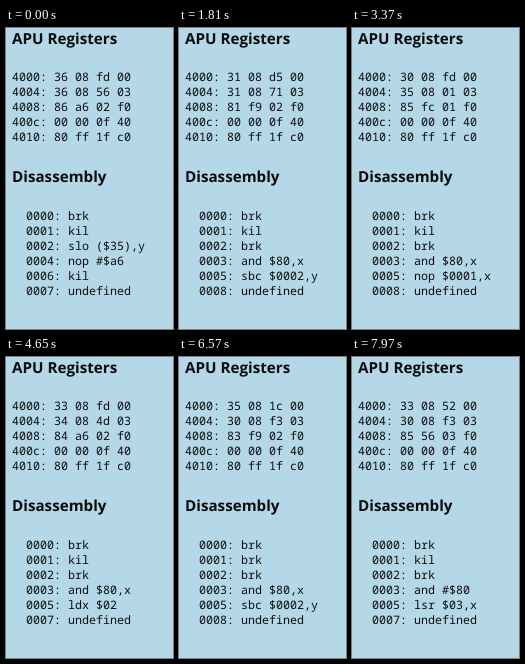
Recreate the animation shown at these times as an HTML page. Size 167 by 301 pixels, loop 8 s.

```html
<!DOCTYPE html>
<html lang="en">
<head>
<meta charset="utf-8">
<title>APU Registers</title>
<style>
  html, body { margin: 0; width: 100%; height: 100%; overflow: hidden; background: #b4d8e7; }
  svg { display: block; width: 167px; height: 301px; }
  text { fill: #0c0c0c; white-space: pre; text-rendering: geometricPrecision; }
  .head { font: bold 15.2px "Open Sans", sans-serif; }
  .code { font: 500 11.667px "Noto Sans Mono", monospace; }
</style>
</head>
<body>
<svg id="stage" viewBox="0 0 167 301"></svg>
<script>
const LOOP = 8000, PITCH = 15, LEFT = 6;

// Phrases: start, end, steps, step at which the values hold, then
// volume/period of both pulses, linear counter and period of the triangle, three work bytes
const phrases = [
  [0, 0, 1, 0, '36 fd 36 56 86 a6 02 02 13 35'],
  [80, 850, 11, -1, '36 fd 36 56 86 a6 02 02 13 35'],
  [930, 1730, 13, 4, '34 d5 34 f8 84 56 03 02 00 35'],
  [1810, 2570, 13, 9, '36 d5 36 74 86 f9 02 02 07 35'],
  [2650, 3450, 13, 11, '30 fd 35 01 85 fc 01 02 00 35'],
  [3490, 4250, 12, 2, '36 fd 36 01 86 fc 01 02 00 35'],
  [4370, 5170, 12, 4, '33 fd 34 4d 84 a6 02 02 00 35'],
  [5330, 6090, 12, 3, '34 d5 34 56 84 56 03 02 00 35'],
  [6250, 6570, 5, 4, '35 1c 30 f3 83 f9 02 00 00 35'],
  [6690, 7050, 7, -1, '35 1c 30 f3 83 f9 02 02 00 35'],
  [7170, 7490, 6, 0, '36 52 30 f3 86 a6 02 02 00 29'],
  [7650, 7970, 6, 5, '33 52 30 f3 85 56 03 02 00 29']
].map(([start, end, count, hold, bytes]) =>
  ({ start, end, count, hold, bytes: bytes.split(' ').map(b => parseInt(b, 16)) }));

// Opcode: mnemonic, operand pattern, length
const opcodes = {
  0x00: ['brk', '', 1], 0x02: ['kil', '', 1], 0x3a: ['nop', '', 1],
  0x13: ['slo', '($#),y', 2], 0x07: ['slo', '$#', 2], 0x29: ['and', '#$#', 2],
  0x35: ['and', '$#,x', 2], 0x56: ['lsr', '$#,x', 2], 0x80: ['nop', '#$#', 2],
  0xa6: ['ldx', '$#', 2], 0xf9: ['sbc', '$#,y', 3], 0xfc: ['nop', '$#,x', 3]
};

const mod = (a, n) => ((a % n) + n) % n;
const hex = (n, len = 2) => (n & 0xffff).toString(16).padStart(len, '0');

function stepTimes({ start, end, count }) {
  if (count === 1) return [start];
  const units = Math.round((end - start) / 40);
  return Array.from({ length: count }, (_, k) =>
    start + (end - start) / units * Math.round(units * k / (count - 1)));
}

function disassemble(mem) {
  const lines = [];
  let pc = 0;
  while (pc < mem.length) {
    const [name, pattern, len] = opcodes[mem[pc]] || ['nop', '', 1];
    const arg = hex(mem[pc + 1] || 0), high = hex(mem[pc + 2] || 0);
    const operand = pattern.replace(/#(?!\$)/, len === 3 ? high + arg : arg);
    lines.push(`  ${hex(pc, 4)}: ${name} ${operand}`);
    pc += len;
  }
  lines.push(`  ${hex(pc, 4)}: undefined`);
  return lines;
}

function makeState({ hold, bytes }, k) {
  const [vol1, low1, vol2, low2, count, low3, high3, w1, w2, w3] = bytes;
  const d = k - hold;
  const fade = v => (v & 0xf0) + mod((v & 15) - d, 7);
  const pulse1 = [low1, 0xa9, 0xd5][mod(Math.floor(d / 4), 3)];
  const pulse2 = (low2 + [0, 3, 0, -3][mod(d, 4)]) & 255;
  const lifted = high3 !== 3 && mod(Math.floor(d / 5), 2) === 1;
  const [tri, triHigh] = lifted ? [0x3a, 2] : [low3, high3];
  const work = mod(d, 4) ? 0 : w2;
  const silent = (vol2 & 15) === 0;
  const registers = [
    [fade(vol1), 8, pulse1, 0],
    [silent ? vol2 : fade(vol2), 8, silent ? low2 : pulse2, 3],
    [fade(count), tri, triHigh, 0xf0],
    [0, 0, 0x0f, 0x40],
    [0x80, 0xff, 0x1f, 0xc0]
  ].map((row, i) => `${hex(0x4000 + 4 * i, 4)}: ${row.map(b => hex(b)).join(' ')}`);
  return { registers, listing: disassemble([0, w1, work, w3, 0x80, tri, triHigh]) };
}

const steps = phrases.flatMap(p => stepTimes(p).map((time, k) => ({ time, ...makeState(p, k) })));

const stage = document.getElementById('stage');
const line = (cls, y, text = '') => `<text class="${cls}" x="${LEFT}" y="${y}">${text}</text>`;
const block = (top, rows) =>
  Array.from({ length: rows }, (_, i) => line('code', top + i * PITCH)).join('');
stage.innerHTML = line('head', 16, 'APU Registers') + block(53, 5) +
  line('head', 154, 'Disassembly') + block(192, 7);
const rows = [...stage.querySelectorAll('.code')];

let shown = null;
function draw() {
  const t = performance.now() % LOOP;
  const step = steps.filter(s => s.time <= t + 0.5).pop();
  if (step !== shown) {
    shown = step;
    rows.forEach((row, i) => {
      row.textContent = (i < 5 ? step.registers[i] : step.listing[i - 5]) || '';
    });
  }
  requestAnimationFrame(draw);
}
draw();
</script>
</body>
</html>
```
